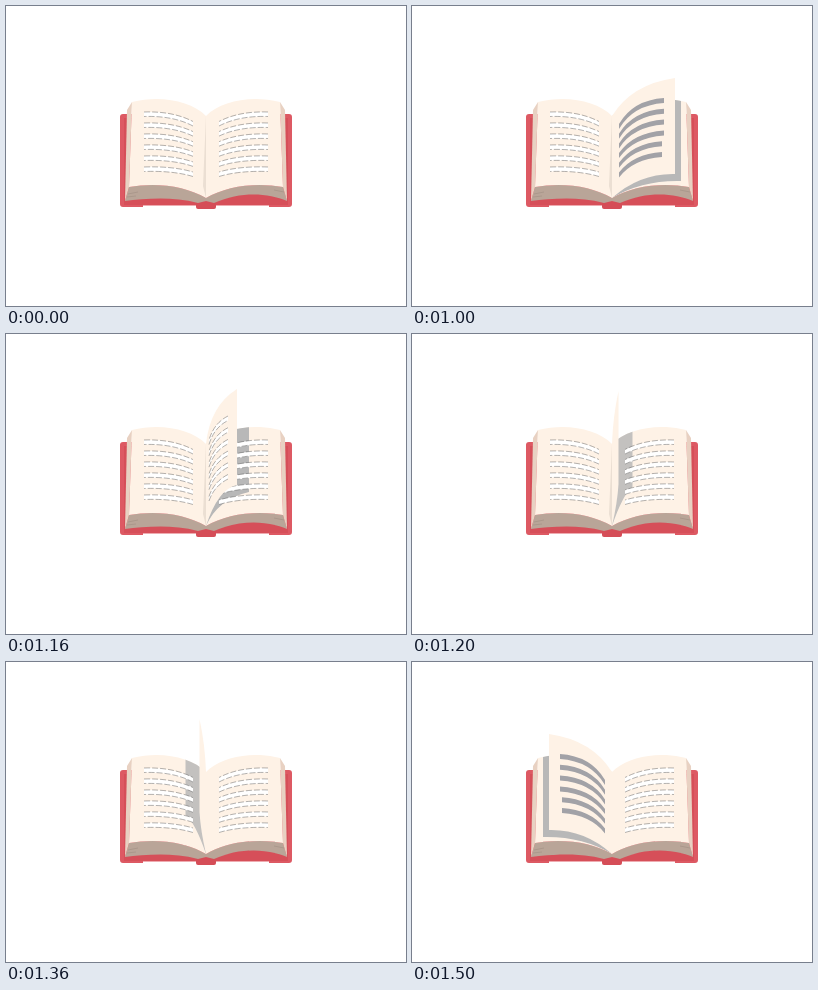
Write an HTML page that moves like this. It is 400x300 px and loops after 1600 ms.

```html
<!DOCTYPE html>
<html lang="en">
<head>
<meta charset="utf-8">
<title>Turning page</title>
<style>
  html, body { margin: 0; width: 100%; height: 100%; overflow: hidden; background: #fff; }
  svg { display: block; width: 100vw; height: 100vh; }
  .edge { fill: #e8d1c2; }
  .page { fill: #fef2e6; }
  .band { fill: #b9a598; }
  .line { fill: #fff; }
  .rim { fill: none; stroke: #555; stroke-width: .45; stroke-dasharray: 6 2; }
  .bar { fill: #a2a2a7; }
</style>
</head>
<body>
<svg viewBox="0 0 400 300">
  <defs>
    <path id="sheet" d="M200 110C215 95 245 89 274 96L277 181C250 176 220 180 200 192Z"/>
    <clipPath id="inside"><use href="#sheet"/></clipPath>
    <g id="half">
      <path class="edge" d="M274 96L279 104L281 195L277 181Z"/>
      <use href="#sheet" class="page"/>
    </g>
  </defs>
  <path d="M117 108H197V112H203V108H283Q286 108 286 111V198Q286 201 283 201H263V199.4H137V201H117Q114 201 114 198V111Q114 108 117 108Z" fill="#dd5963"/>
  <path d="M118 112H282V199H118Z" fill="#d64f59"/>
  <path d="M190 196H210V201Q210 203 208 203H192Q190 203 190 201Z" fill="#d54d57"/>
  <path id="bandRight" class="band"/>
  <path id="bandLeft" class="band" transform="matrix(-1 0 0 1 400 0)"/>
  <use href="#half"/>
  <use href="#half" transform="matrix(-1 0 0 1 400 0)"/>
  <path d="M200 110L197 180L200 192Z" fill="#ebdfd3"/>
  <path d="M122 188L132 186M121 191L130 190M278 186L268 184" stroke="#a18f84" stroke-width=".6"/>
  <g id="shadow"><path clip-path="url(#inside)"/></g>
  <g id="textRight"><path class="line"/><path class="rim"/></g>
  <use href="#textRight" transform="matrix(-1 0 0 1 400 0)"/>
  <g id="leaf"><path class="page"/><path/><path class="rim"/></g>
</svg>
<script>
const find = selector => document.querySelector(selector);
const MIRROR = 'matrix(-1 0 0 1 400 0)';
const START = 1000, STEP = 100, LOOP = 1600;

// Half-poses are drawn on the right and mirrored for the left.
const poses = [
  { tip: [263, 72], top: [220, 78], foot: 168, curl: [228, 167], shadow: [269, 175, 230, 174], shade: '#b8b8b8', text: 'bar' },
  { tip: [231, 55], top: [204, 72], foot: 151, curl: [212, 155], shadow: [243, 158, 212, 165], shade: '#b8b8b8', text: 'line' },
  { tip: [206.5, 57], top: [201, 82], foot: 150, curl: [205.5, 168], shadow: [220.5, 153, 211, 160], shade: '#c3c1bf', text: '' }
];

// A curved strip running from its outer end to the gutter.
const strip = (x0, y0, cx, cy, x1, y1, h) =>
  `M${x0} ${y0}Q${cx} ${cy} ${x1} ${y1}v${h}Q${cx} ${cy + h} ${x0} ${y0 + h}Z`;
const rows = draw => [0, 1, 2, 3, 4, 5].map(draw).join('');
// The long edges of strips, without their ends.
const rim = strips => strips.replace(/v/g, 'm0 ').replace(/Z/g, '');

const text = rows(i => {
  const y = 106 + 11 * i;
  return strip(262, y, 233, y - 1, 213, y + 9.5 - .9 * i, 4.5);
});
const leafText = {
  bar: rows(i => {
    const y = 92 + 10.8 * i;
    return strip(i < 4 ? 252 : 250, y, 221, y + 2, 207, 118 + 9.7 * i, 5);
  }),
  line: rows(i => {
    const y = 82 + 11.7 * i;
    return strip(222, y, 208, y + 7, 203, 106 + 11.3 * i, 4.5);
  }),
  '': ''
};

const band = (a, b) =>
  `M200 192C220 180 250 176 277 181L281 195C262 ${a} 235 ${b} 208 197L200 195Z`;

find('#bandRight').setAttribute('d', band(187, 185));
find('#bandLeft').setAttribute('d', band(193, 190));
const [lines, lineRims] = find('#textRight').children;
lines.setAttribute('d', text);
lineRims.setAttribute('d', rim(text));

const leaf = find('#leaf'), shadow = find('#shadow');
const [paper, print, printRims] = leaf.children;
const cast = shadow.firstElementChild;
let shown;

function draw(time) {
  const step = Math.floor((time % LOOP - START) / STEP);
  if (step === shown) return;
  shown = step;
  for (const part of [leaf, shadow]) {
    part.setAttribute('visibility', step >= 0 ? 'visible' : 'hidden');
    part.setAttribute('transform', step > 2 ? MIRROR : '');
  }
  if (step < 0) return;
  const pose = poses[step < 3 ? step : 5 - step];
  const { tip, top, foot, curl, shade, text: kind } = pose;
  const [x, y, cx, cy] = pose.shadow;
  paper.setAttribute('d', `M200 192V110Q${top} ${tip}V${foot}Q${curl} 200 192Z`);
  print.setAttribute('d', leafText[kind]);
  print.setAttribute('class', kind);
  printRims.setAttribute('d', kind === 'line' ? rim(leafText.line) : '');
  cast.setAttribute('d', `M200 110L${tip[0]} 90H${x}V${y}Q${cx} ${cy} 200 192Z`);
  cast.setAttribute('fill', shade);
}

const begin = performance.now();
function tick() {
  draw(performance.now() - begin);
  requestAnimationFrame(tick);
}
tick();
</script>
</body>
</html>
```
